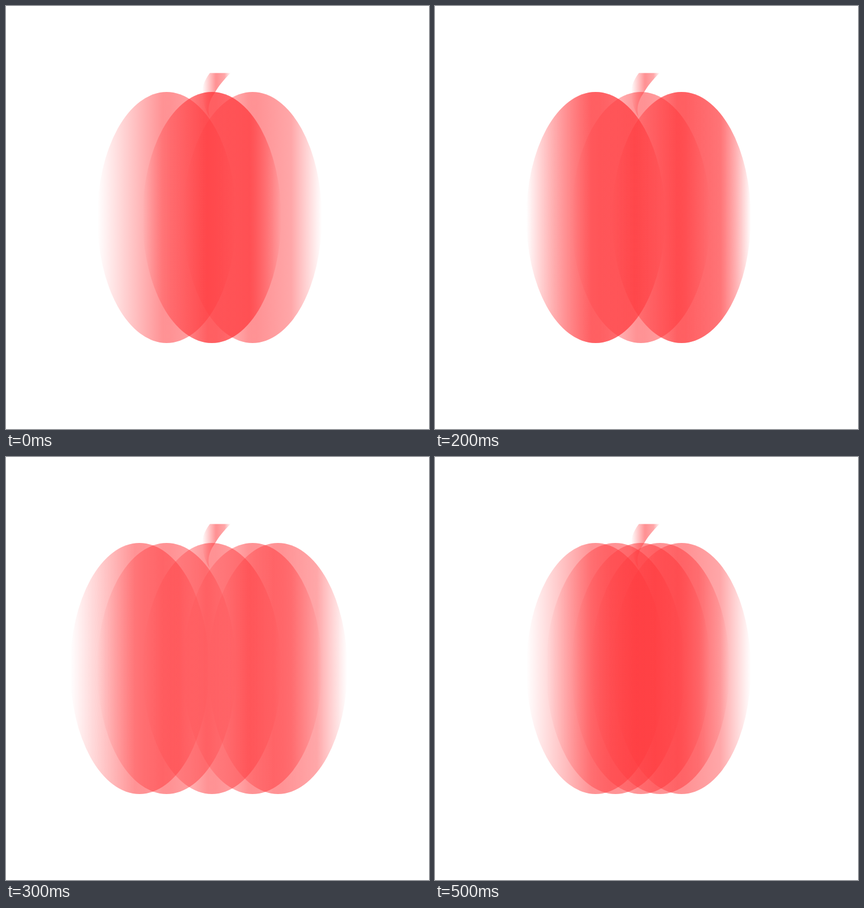
Write an HTML page that moves like this. It is 748 by 748 pixels and loops after 0.6 s.

```html
<!DOCTYPE html>
<html lang="en">
<head>
<meta charset="utf-8">
<title>Pumpkin</title>
<style>
  html, body { margin: 0; width: 100%; height: 100%; overflow: hidden; background: #fff; }
  svg { display: block; width: 100vw; height: 100vh; }
  .left, .right { animation: 600ms step-end infinite; }
  .left { animation-name: left; }
  .right { animation-name: right; }

  /* The lobes slide out of the middle one and back, in held steps. */
  @keyframes left {
    0% { transform: translateX(0); }
    16.667% { transform: translateX(-37px); }
    33.333% { transform: translateX(-80px); }
    50% { transform: translateX(-128px); }
    66.667% { transform: translateX(-81px); }
    83.333% { transform: translateX(-45px); }
  }
  @keyframes right {
    0% { transform: translateX(0); opacity: 0; }
    16.667% { transform: translateX(30px); opacity: 1; }
    33.333% { transform: translateX(72px); opacity: 1; }
    50% { transform: translateX(117px); opacity: 1; }
    66.667% { transform: translateX(71px); opacity: 1; }
    83.333% { transform: translateX(34px); opacity: 1; }
  }
</style>
</head>
<body>
<svg viewBox="0 0 748 748">
  <defs>
    <linearGradient id="glow">
      <stop offset="0" stop-color="#ff3236" stop-opacity="0"/>
      <stop offset=".47" stop-color="#ff3236" stop-opacity=".53"/>
      <stop offset=".53" stop-color="#ff3236" stop-opacity=".53"/>
      <stop offset=".78" stop-color="#ff3236" stop-opacity=".43"/>
      <stop offset="1" stop-color="#ff3236" stop-opacity="0"/>
    </linearGradient>
    <ellipse id="lobe" cx="364" cy="374" rx="122.5" ry="222"/>
  </defs>
  <g fill="url(#glow)">
    <path d="M360.500 118.500H397.500C384 131 376 142 370 152C361 165 355 178 360 196C351 182 347 166 347 150C348 138 354 127 360.500 118.500Z"/>
    <use href="#lobe" x="-80"/>
    <use href="#lobe" x="72"/>
    <use href="#lobe"/>
    <g class="left"><use href="#lobe"/></g>
    <g class="right"><use href="#lobe"/></g>
  </g>
</svg>
</body>
</html>
```
